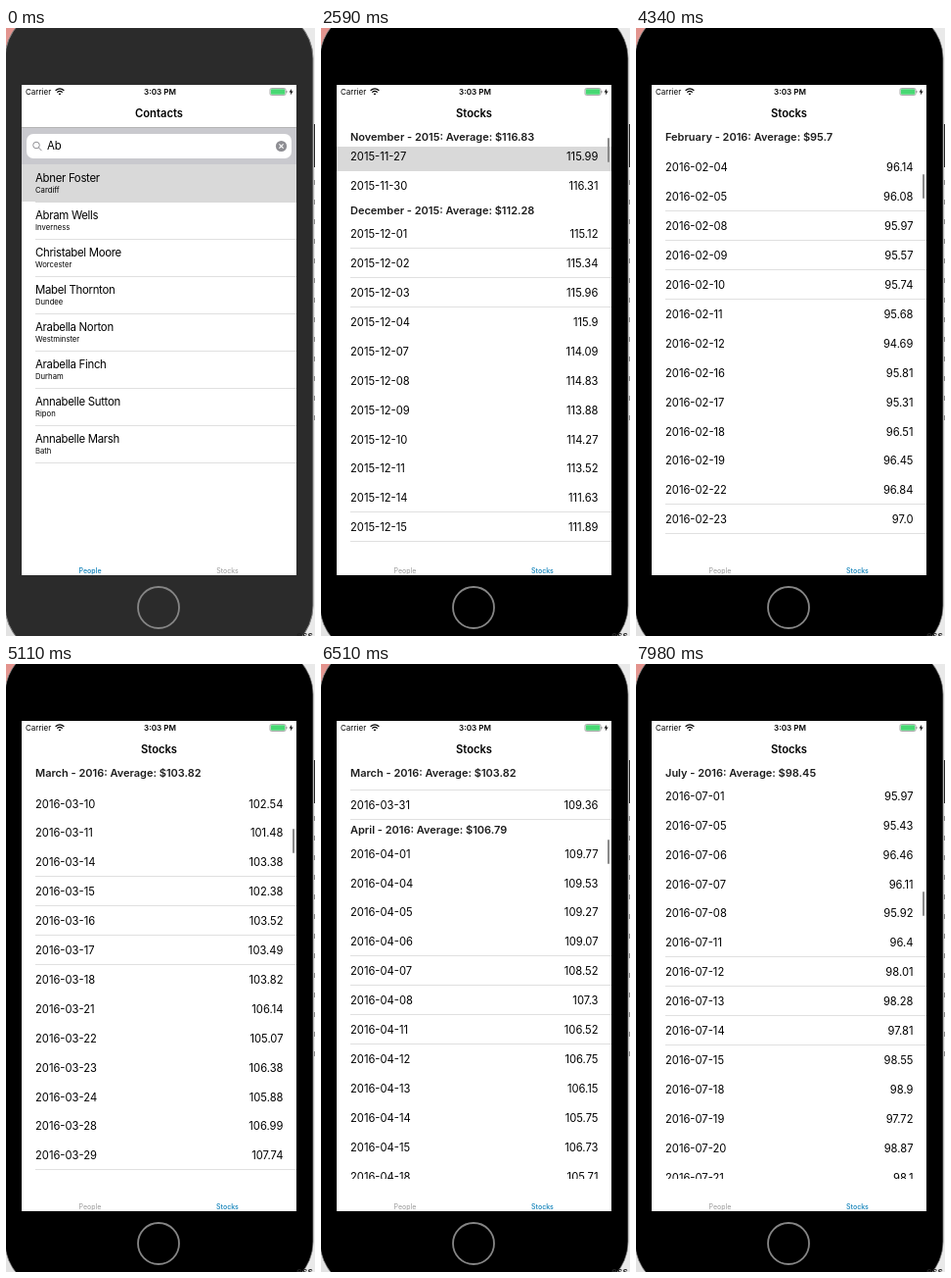
An HTML page for the animation above (8 s loop, 316 px wide and 620 px high).

```html
<!DOCTYPE html>
<html lang="en">
<head>
<meta charset="utf-8">
<title>Contacts and stocks</title>
<style>
html, body { margin: 0; width: 100%; height: 100%; overflow: hidden; background: #e6e6e6; }
#stage { position: absolute; left: 0; top: 0; width: 316px; height: 620px; overflow: hidden;
  font-family: Inter, Roboto, sans-serif; color: #000; white-space: nowrap; }
#stage svg { position: absolute; left: 0; top: 0; }
.screen { position: absolute; left: 16px; top: 58px; width: 281px; height: 500px; background: #fff; overflow: hidden; }
.screen div, .screen span { position: absolute; box-sizing: border-box; }
.view { left: 0; top: 14px; width: 281px; height: 486px; background: #fff; }
.title { left: 0; width: 281px; top: 5px; text-align: center; font: 600 11.2px/20px Inter, Roboto, sans-serif; }
.rule { left: 0; top: 29px; width: 281px; height: 1px; background: #b4b4b4; }
.tab { top: 477px; width: 60px; text-align: center; font-size: 7px; line-height: 10px; color: #999; }
.tab.on { color: #0b7fb8; font-weight: 500; }
.bar { left: 0; top: 30px; width: 281px; height: 37px; background: #c9c9ce; }
.field { left: 5px; top: 6px; width: 271px; height: 25px; border-radius: 7px; background: #fff; }
.field span { left: 21px; font-size: 11.4px; line-height: 25px; }
.person { left: 0; width: 281px; height: 38px; }
.person::after { content: ""; position: absolute; left: 14px; right: 0; bottom: -1px; height: 1px; background: #e0e0e0; }
.person.on, .person.on::after, .row.on { background: #d9d9d9; }
.name { left: 14px; top: 4px; font-size: 11.4px; line-height: 20px; letter-spacing: -.3px; }
.city { left: 14px; top: 22px; font-size: 7.7px; line-height: 10px; }
#list { left: 0; top: 29px; width: 281px; height: 424px; overflow: hidden; }
.row { left: 0; top: 0; width: 281px; height: 30px; font-size: 11.2px; line-height: 30px; }
.row.line::after { content: ""; position: absolute; left: 14px; right: 0; bottom: 0; height: 1px; background: #e0e0e0; }
.row span:first-child { left: 14px; }
.row span:last-child { right: 13.5px; }
.head { left: 0; top: 0; width: 281px; height: 20px; padding-left: 14px; z-index: 2; background: #fff;
  color: #1c1c1c; font: 600 11px/21px Inter, Roboto, sans-serif; }
#thumb { left: 277px; top: 0; width: 2px; height: 25px; border-radius: 1px; background: #8a8a8a; z-index: 3; }
.carrier { left: 4px; top: 2px; font-size: 8px; line-height: 10px; }
.clock { left: 0; top: 2px; width: 283px; text-align: center; font-size: 8.1px; line-height: 10px; font-weight: 600; }
.edge { position: absolute; left: 297px; top: 613px; font: 600 10px/12px Inter, sans-serif; color: #222; }
</style>
</head>
<body>
<div id="stage">
  <svg width="316" height="620" viewBox="0 0 316 620">
    <defs>
      <linearGradient id="desk" x1="0" y1="0" x2="0" y2="1">
        <stop offset="0" stop-color="#e3928c"/><stop offset=".12" stop-color="#d9b5b1"/><stop offset=".3" stop-color="#e2e2e2"/>
      </linearGradient>
    </defs>
    <rect width="316" height="620" fill="#e9e9e9"/>
    <rect width="60" height="620" fill="url(#desk)"/>
    <path d="M315.5 98V142" stroke="#222"/>
    <path d="M315.5 155V405" stroke="#888" stroke-dasharray="5 15"/>
    <rect x="-1" y="-19" width="315" height="658" rx="50" fill="#2b2b2b" stroke="#858585"/>
    <rect id="black" x="-.5" y="-18.5" width="314" height="657" rx="49.5" fill="#000"/>
    <circle cx="156" cy="591" r="21" fill="none" stroke="#858585" stroke-width="1.8"/>
  </svg>
  <div class="edge">ess</div>
  <div class="screen">
    <span class="carrier">Carrier</span>
    <span class="clock">3:03 PM</span>
    <svg width="281" height="14" viewBox="16 58 281 14">
      <path d="M50.6 63.8Q55 59.8 59.4 63.8M52.3 65.6Q55 63.2 57.7 65.6" fill="none" stroke="#000" stroke-width="1.2"/>
      <path d="M53.6 67Q55 65.8 56.4 67L55 68.6Z"/>
      <rect x="270" y="61.5" width="16" height="7" rx="1.5" fill="none" stroke="#888" stroke-width=".7"/>
      <rect x="270.8" y="62.3" width="14.4" height="5.4" rx=".8" fill="#47d873"/>
      <path d="M286.9 64V66.2" stroke="#888"/>
      <path d="M292.2 61.8L289.6 65.6H291.4L290.8 68.4L293.6 64.4H291.7Z"/>
    </svg>
    <div class="view" id="people">
      <div class="title">Contacts</div>
      <div class="bar">
        <div class="field">
          <span>Ab</span>
          <svg width="271" height="25" viewBox="0 0 271 25">
            <g fill="none" stroke="#8e8e93"><circle cx="10" cy="11.5" r="3.3"/><path d="M12.5 14L15.5 17.2"/></g>
            <circle cx="260.5" cy="12.5" r="5.6" fill="#8e8e93"/>
            <path d="M258.4 10.4L262.6 14.6M262.6 10.4L258.4 14.6" stroke="#fff" stroke-width="1.1"/>
          </svg>
        </div>
      </div>
      <div class="rule"></div>
      <div class="tab on" style="left:40px">People</div>
      <div class="tab" style="left:180.5px">Stocks</div>
    </div>
    <div class="view" id="stocks">
      <div class="title">Stocks</div>
      <div id="list"><div id="thumb"></div></div>
      <div class="rule"></div>
      <div class="tab" style="left:40px">People</div>
      <div class="tab on" style="left:180.5px">Stocks</div>
    </div>
  </div>
</div>
<script>
const $ = id => document.getElementById(id);
const ROW = 29.9, HEAD = 19.5, VIEW = 424, LOOP = 8000, STEP = 70;

function add(parent, cls, ...texts) {
  const el = document.createElement('div');
  el.className = cls;
  if (texts.length === 1) el.textContent = texts[0];
  else for (const t of texts) el.appendChild(document.createElement('span')).textContent = t;
  parent.appendChild(el);
  return el;
}

const people = [
  ['Abner Foster', 'Cardiff'], ['Abram Wells', 'Inverness'], ['Christabel Moore', 'Worcester'],
  ['Mabel Thornton', 'Dundee'], ['Arabella Norton', 'Westminster'], ['Arabella Finch', 'Durham'],
  ['Annabelle Sutton', 'Ripon'], ['Annabelle Marsh', 'Bath']
];
people.forEach(([name, city], i) => {
  const el = add($('people'), i ? 'person' : 'person on');
  el.style.top = 67 + i * 38 + 'px';
  add(el, 'name', name);
  add(el, 'city', city);
});

// Prices follow a few key points, one every SPAN rows, with seeded jitter
const SPAN = 16, trend = [116.2, 115.5, 107.2, 98.6, 95, 101.3, 109, 105, 94.5, 98.5, 95.5, 99.6];
let seed = 7;
function jitter() {
  seed = seed * 16807 % 2147483647;
  return seed / 2147483647 - .5;
}
function price(i) {
  const k = Math.floor(i / SPAN), u = i / SPAN - k;
  const p = trend[k] + (trend[k + 1] - trend[k]) * u + 2 * jitter();
  return p.toFixed(2).replace(/0$/, '');
}

// Trading days: weekdays without holidays
const holidays = '11-26 12-25 01-01 01-18 02-15 03-25 05-30 07-04'.split(' ');
const averages = '116.83 112.28 98.71 95.7 103.82 106.79 94.96 96.59 98.45'.split(' ');
const rows = [], heads = [];
let end = 0, month, picked;
for (let day = Date.UTC(2015, 10, 11); day < Date.UTC(2016, 6, 23); day += 864e5) {
  const d = new Date(day), date = d.toISOString().slice(0, 10);
  if (d.getUTCDay() % 6 === 0 || holidays.includes(date.slice(5))) continue;
  if (month !== d.getUTCMonth()) {
    month = d.getUTCMonth();
    const name = d.toLocaleString('en', { month: 'long', timeZone: 'UTC' });
    const label = `${name} - ${d.getUTCFullYear()}: Average: $${averages[heads.length]}`;
    heads.push({ el: add($('list'), 'head', label), y: end });
    end += HEAD;
  }
  const el = add($('list'), 'row', date, price(rows.length));
  if (date === '2015-11-27') picked = el;
  rows.push({ el, y: end });
  end += ROW;
}

// Scroll offset over time: monotone cubic through [ms, px]
const path = [[1890, 0], [1960, 17.9], [2590, 333.4], [3570, 908.8], [5110, 2492.9], [6510, 2909.8], [7980, 4940.65]];
const secant = i => (path[i + 1][1] - path[i][1]) / (path[i + 1][0] - path[i][0]);
const slopes = path.map((_, i) => {
  if (!i) return secant(0);
  if (i === path.length - 1) return secant(i - 1);
  const a = secant(i - 1), b = secant(i);
  return 2 * a * b / (a + b);
});
function offset(t) {
  if (t <= path[0][0]) return 0;
  let i = 0;
  while (i < path.length - 2 && t > path[i + 1][0]) i++;
  const [t0, y0] = path[i], [t1, y1] = path[i + 1], d = t1 - t0, u = (t - t0) / d, v = 1 - u;
  return v * v * (1 + 2 * u) * y0 + u * u * (3 - 2 * u) * y1 + d * u * v * (v * slopes[i] - u * slopes[i + 1]);
}

function place(el, y, h) {
  const seen = y > -h && y < VIEW;
  el.style.display = seen ? '' : 'none';
  if (seen) el.style.transform = `translateY(${Math.round(y)}px)`;
}

function draw(t) {
  const mix = Math.max(0, Math.min(1, (t - 630) / 490)), off = offset(t);
  $('black').style.opacity = $('stocks').style.opacity = mix;
  for (const r of rows) {
    const y = r.y - off, f = y + ROW + .1;
    place(r.el, y, 30);
    // Hairlines only show where they fall near a whole pixel
    r.el.classList.toggle('line', f - Math.floor(f) < .4);
  }
  heads.forEach((h, i) => {
    const next = heads[i + 1] ? heads[i + 1].y - off - HEAD : Infinity;
    place(h.el, Math.min(Math.max(0, h.y - off), next), 20);
  });
  picked.classList.toggle('on', t >= 1960);
  $('thumb').style.display = t >= 1960 ? '' : 'none';
  $('thumb').style.transform = `translateY(${Math.round(1.8 + off * .0262)}px)`;
}

const start = performance.now();
let shown = -1;
function tick() {
  const t = Math.floor((performance.now() - start) % LOOP / STEP) * STEP;
  if (t !== shown) draw(shown = t);
  requestAnimationFrame(tick);
}
tick();
</script>
</body>
</html>
```
